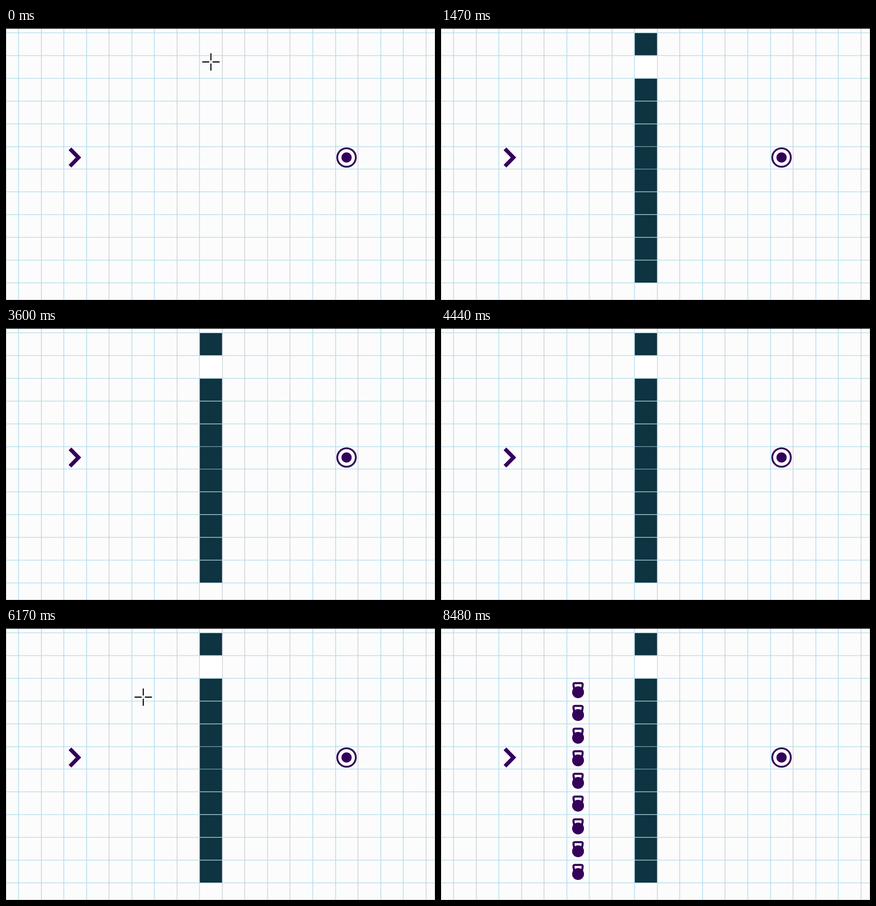
Recreate the animation shown at these times as an HTML page. Size 939 by 597 pixels, loop 8.52 s.

```html
<!DOCTYPE html>
<html lang="en">
<head>
<meta charset="utf-8">
<title>Drawing walls and weights on a grid</title>
<style>
  html, body { margin: 0; width: 100%; height: 100%; overflow: hidden; background: #fcfcfc; }
  svg { display: block; width: 939px; height: 597px; }
</style>
</head>
<body>
<svg id="stage" viewBox="0 0 939 597" xmlns="http://www.w3.org/2000/svg"></svg>
<script>
const LOOP = 8520, REACTION = 125, GROW = 150;
const INK = '#34005a', WALL = '#0d3440', BLUE = '#aedcf4', GREY = '#cbd0d6';

const stage = document.getElementById('stage');
function add(tag, attrs, parent = stage) {
  const node = document.createElementNS('http://www.w3.org/2000/svg', tag);
  for (const key in attrs) node.setAttribute(key, attrs[key]);
  return parent.appendChild(node);
}
const line = (d, stroke, width) => add('path', { d, stroke, fill: 'none', 'stroke-width': width });
const show = (node, visible) => { node.style.display = visible ? '' : 'none'; };
const colX = c => Math.floor(27.5 + 49.54 * c) + 0.5;
const rowY = r => Math.floor(10.95 + 49.83 * r) + 0.5;
const midCol = c => (colX(c) + colX(c + 1)) / 2;
const midRow = r => (rowY(r) + rowY(r + 1)) / 2;

add('rect', { width: 939, height: 597, fill: '#fcfcfc' });
for (let c = 0; c < 19; c++) {
  const k = c % 11;
  line(`M${colX(c)} 0V597`, k < 9 && k % 3 !== 1 ? BLUE : GREY, 1.6);
}
for (let r = 0; r < 12; r++) line(`M0 ${rowY(r)}H939`, '#b5dcea', 1.6);
line('M.5 0V597M938.5 0V597M0 596.5H939', '#c3c5ba', 1);
line('M0 .7H939', '#000', 1.4);

line('M140 265.2L158.7 284.3L140 303.4', INK, 8.4);
add('circle', { cx: 745.4, cy: 284.2, r: 20.3, fill: '#fff', stroke: INK, 'stroke-width': 4 });
add('circle', { cx: 745.4, cy: 284.2, r: 11.2, fill: INK });

// Drags run down a column at constant speed; a cell reacts a little after the pointer enters it.
const wallDrag = { col: 8, start: 280, from: 40, speed: 0.565 };
const weightDrag = { col: 5, start: 6125, from: 132, speed: 0.43 };
const dragY = (drag, t) => drag.from + drag.speed * (t - drag.start);
const reactTime = (drag, r) =>
  drag.start + Math.max(0, rowY(r) - drag.from) / drag.speed + REACTION;

const gapStart = reactTime(wallDrag, 1);
const gap = add('rect', { x: colX(8) + 0.8, y: rowY(1) + 0.8, width: 48.4, height: 48.4, fill: '#fff' });

const cells = [];
function addCell(draw, drag, row, start = reactTime(drag, row), end = LOOP) {
  const node = add('g', {});
  draw(node);
  cells.push({ node, x: midCol(drag.col), y: midRow(row), start, end });
}
const drawWall = g => add('rect', { x: -24.3, y: -24.3, width: 48.6, height: 48.6, fill: WALL }, g);
function drawWeight(g) {
  add('path', {
    d: 'M-8 1L-10 -10Q-10.5 -14.5 -7 -14.5H7Q10.5 -14.5 10 -10L8 1',
    fill: '#fff', stroke: INK, 'stroke-width': 4.6
  }, g);
  add('circle', { cy: 5.5, r: 13, fill: INK }, g);
}

addCell(drawWall, wallDrag, 0);
addCell(drawWall, wallDrag, 1, 160, gapStart);
for (let r = 2; r <= 10; r++) {
  addCell(drawWall, wallDrag, r);
  addCell(drawWeight, weightDrag, r);
}

const cursor = add('g', {});
const arms = 'M-19 0H-3.5M3.5 0H19M0 -19V-3.5M0 3.5V19';
add('path', { d: arms, stroke: '#fff', 'stroke-width': 4 }, cursor);
add('path', { d: arms, stroke: '#000', 'stroke-width': 2.4 }, cursor);
add('circle', { r: 1.2, fill: '#aaa' }, cursor);

const easeOut = p => 1 - (1 - p) ** 3;
function between(t, t0, t1, a, b, ease = p => p) {
  const p = Math.min(1, Math.max(0, (t - t0) / (t1 - t0)));
  return a + (b - a) * ease(p);
}

function pointerAt(t) {
  if (t < 4000) return {
    x: between(t, 0, 800, 448.5, 456.5),
    y: t < wallDrag.start ? between(t, 120, wallDrag.start, 74.5, wallDrag.from) : dragY(wallDrag, t)
  };
  return {
    x: between(t, 5240, 5700, 264.7, 300) + between(t, weightDrag.start, 6970, 0, 8.5),
    y: t < weightDrag.start ? between(t, 4900, 5400, -40, weightDrag.from, easeOut) : dragY(weightDrag, t)
  };
}

function render(t) {
  for (const { node, x, y, start, end } of cells) {
    const scale = between(t, start, start + GROW, 0.3, 1, p => 1 - (1 - p) ** 2);
    show(node, t >= start && t < end);
    node.setAttribute('transform', `translate(${x} ${y}) scale(${scale})`);
  }
  show(gap, t >= gapStart);
  const { x, y } = pointerAt(t);
  cursor.setAttribute('transform', `translate(${x} ${y})`);
}

const began = performance.now();
function tick() {
  render((performance.now() - began) % LOOP);
  requestAnimationFrame(tick);
}
tick();
</script>
</body>
</html>
```
